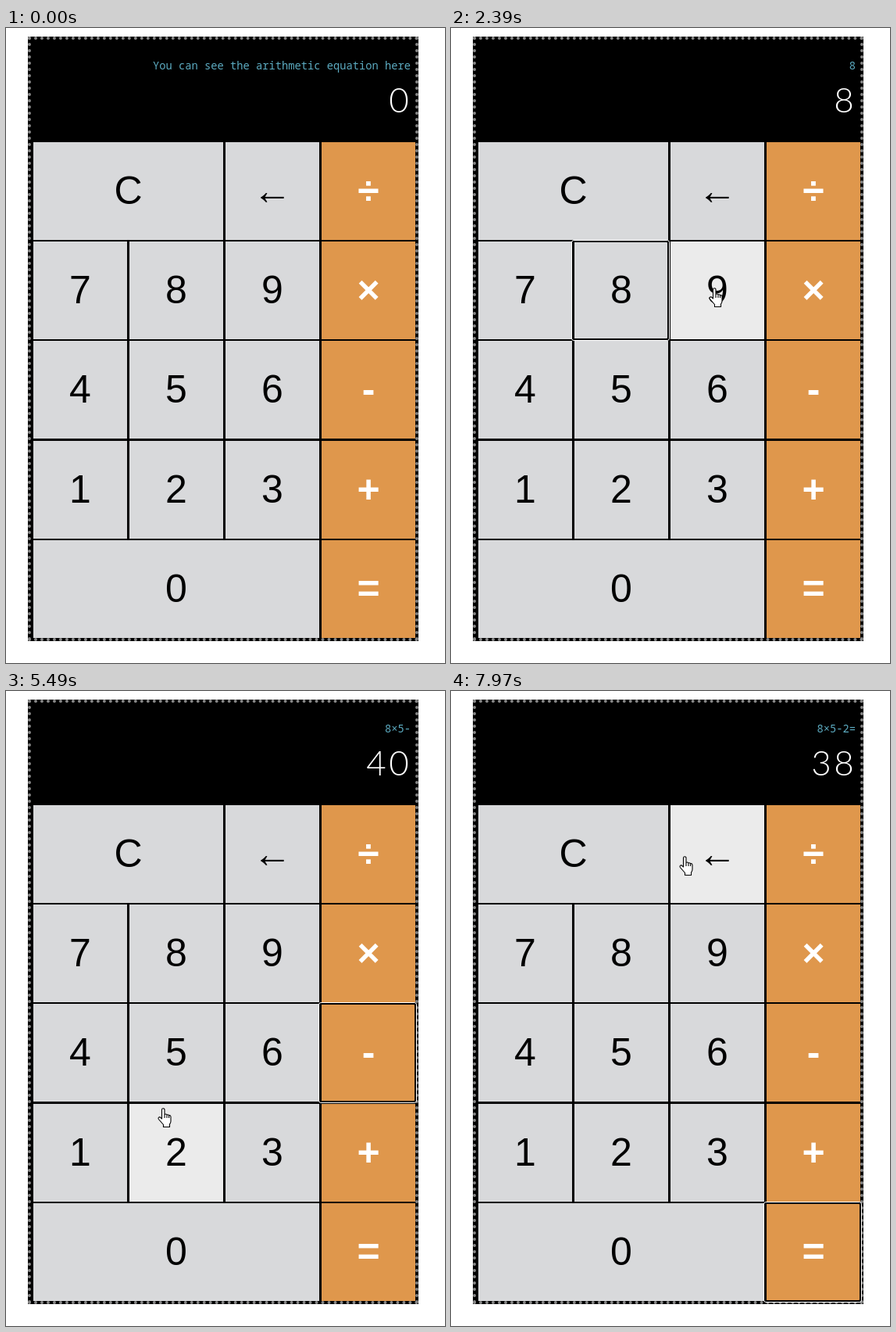
Recreate the animation shown at these times as an HTML page. Size 562 by 812 pixels, loop 8 s.

```html
<!DOCTYPE html>
<html lang="en">
<head>
<meta charset="utf-8">
<title>Calculator</title>
<style>
  html, body { margin: 0; width: 100%; height: 100%; overflow: hidden; background: #fff; }
  div, svg { position: absolute; box-sizing: border-box; }
  #case { left: 28px; top: 11px; width: 500px; height: 773px; background: #000; border: 4px dotted #888; }
  #equation, #result { right: auto; width: 488px; text-align: right; white-space: pre; }
  #equation { left: 30px; top: 38px; line-height: 20px; font-size: 13.75px; font-family: "Noto Sans Mono", monospace; color: #5cabc1; }
  #result { left: 31px; top: 61px; line-height: 60px; font: 300 44px/60px Lato, sans-serif; letter-spacing: 3.3px; color: #fff; }
  .key { background: #d8d9db; color: #000; font: 50px/125px "Liberation Sans", Arial, sans-serif; text-align: center; }
  .key.hover { background: #ebebeb; }
  .key.active { background: #bbbcbe; }
  .key.op { background: #df974c; color: #fff; font-weight: bold; }
  .key.op.hover { background: #dfb07e; }
  #ring { border: 2px solid #000; border-radius: 3px; box-shadow: 0 0 0 1px #fff; }
  svg { left: 0; top: 0; width: 24px; height: 28px; overflow: visible; }
  path { fill: #fff; stroke: #000; stroke-width: 1.1; stroke-linejoin: round; }
</style>
</head>
<body>
<div id="case"></div>
<div id="equation"></div>
<div id="result"></div>
<div id="keys"></div>
<div id="ring"></div>
<svg id="hand"><path d="M5.5 14V2.5a1.75 1.75 0 0 1 3.5 0V8.5q1.7-1.2 3 .5 1.6-.8 2.6.7 2-.4 2.4 1.6V17q0 2.5-1.5 4V24.5H7.5V21.5L1.3 14.5q-.9-1.6.4-2.4 1.6-.6 2.6.7zM9 8.5V13M12 9V13M14.6 9.7V13"/></svg>
<svg id="arrow"><path d="M0 0V17l4-4 3 6.5 2.5-1-3-6.5h5.5z"/></svg>
<script>
const LOOP = 8000;
const $ = id => document.getElementById(id);

// Keys: column starts and row starts, each key spanning one or more columns.
const COLS = [35, 158, 281, 404], ROWS = [146, 273, 400, 528, 655];
const KEY_W = 120, KEY_H = 125, GAP = 3;
const layout = ['CC←÷', '789×', '456-', '123+', '000='];
const keys = {};

layout.forEach((line, row) => {
  for (const label of new Set(line)) {
    const first = line.indexOf(label), last = line.lastIndexOf(label);
    const x = COLS[first], y = ROWS[row], w = COLS[last] + KEY_W - x;
    const el = document.createElement('div');
    el.textContent = label;
    place(el, x, y, w, KEY_H);
    $('keys').append(el);
    keys[label] = { el, x, y, w, op: last === 3 };
  }
});

function place(el, x, y, w, h) {
  Object.assign(el.style, { left: x + 'px', top: y + 'px', width: w + 'px', height: h + 'px' });
}

// Pointer moves: first step, last step, number of steps, destination.
const START = [440, 500];
const moves = [
  [210, 370, 3, 215, 340],
  [520, 830, 5, 97, 66],
  [900, 980, 2, 97, 106],
  [1060, 1210, 3, 153, 237],
  [1530, 1610, 2, 155, 340],
  [2310, 2540, 4, 397, 330],
  [2770, 2920, 3, 481, 302],
  [3550, 3700, 3, 250, 453],
  [4330, 4560, 4, 428, 455],
  [5260, 5490, 4, 201, 534],
  [6180, 6350, 3, 350, 674],
  [6420, 6730, 5, 452, 691],
  [7510, 7970, 7, 299, 212]
];

// Clicks: press time, release time, key, then the display after release.
const clicks = [
  [1910, 2160, '8', '8', '8'],
  [3170, 3320, '×', '8×', '8'],
  [3870, 4100, '5', '8×5', '8'],
  [4790, 4940, '-', '8×5-', '40'],
  [5720, 5950, '2', '8×5-2', '40'],
  [6960, 7130, '=', '8×5-2=', '38']
];

// The pointer advances in discrete steps, slowing towards its destination.
function pointerAt(t) {
  let [x, y] = START;
  for (const [from, to, steps, toX, toY] of moves) {
    if (t < from) break;
    const step = Math.floor((t - from) / (to - from) * (steps - 1) + 0.05);
    const left = 1 - Math.min(step + 1, steps) / steps;
    const eased = 1 - left * left;
    x += (toX - x) * eased;
    y += (toY - y) * eased;
  }
  return [Math.round(x), Math.round(y)];
}

function keyAt(x, y) {
  return Object.keys(keys).find(label => {
    const k = keys[label];
    return x >= k.x - GAP && x < k.x + k.w && y >= k.y - 2 && y < k.y + KEY_H;
  });
}

function showPointer(el, visible, x, y) {
  el.style.display = visible ? 'block' : 'none';
  el.style.transform = `translate(${x}px, ${y}px)`;
}

function draw(t) {
  const visible = t >= moves[0][0];
  const [x, y] = pointerAt(t);
  const hovered = visible && keyAt(x, y);
  const pressed = clicks.find(([down, up]) => t >= down && t < up)?.[2];
  const focused = clicks.findLast(([down]) => t >= down)?.[2];
  const shown = clicks.findLast(([, up]) => t >= up);

  for (const label in keys) {
    const { el, op } = keys[label];
    el.className = 'key' + (op ? ' op' : '') +
      (label === hovered ? ' hover' : '') + (label === pressed ? ' active' : '');
  }

  $('ring').style.display = focused ? 'block' : 'none';
  if (focused) {
    const k = keys[focused];
    place($('ring'), k.x - GAP, k.y - 1, k.w + 4, KEY_H + 2);
  }

  $('equation').textContent = shown ? shown[3] : 'You can see the arithmetic equation here';
  $('result').textContent = shown ? shown[4] : '0';
  showPointer($('hand'), visible && hovered, x - 7, y - 1);
  showPointer($('arrow'), visible && !hovered, x, y);
}

function tick() {
  draw(performance.now() % LOOP);
  requestAnimationFrame(tick);
}
tick();
</script>
</body>
</html>
```
